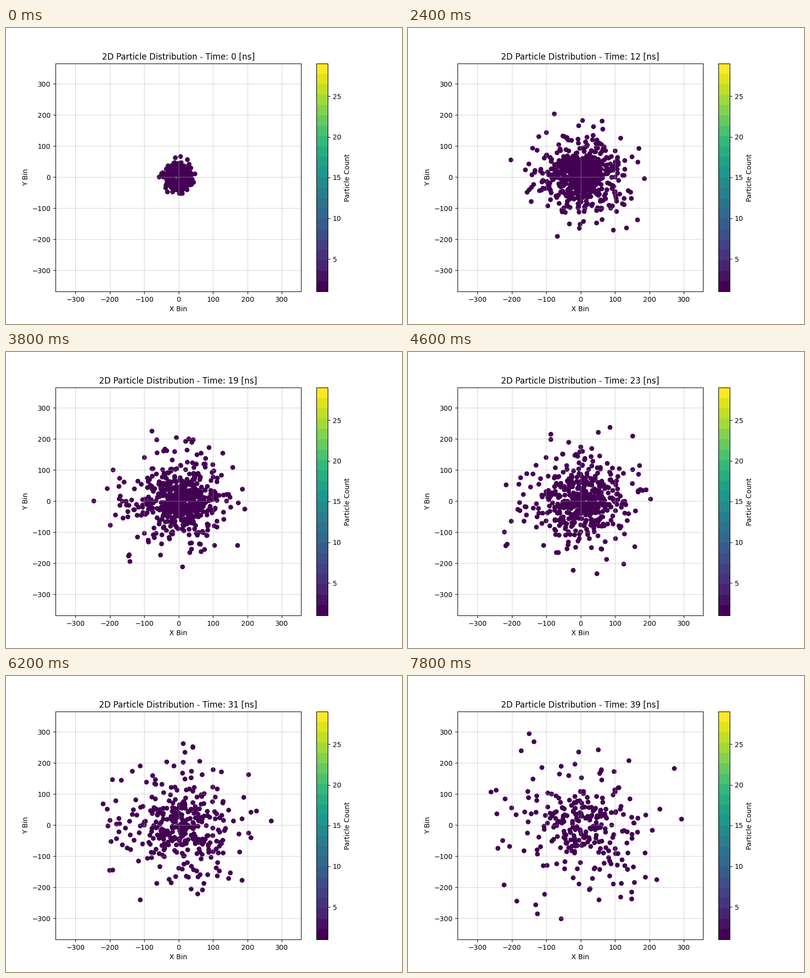
A matplotlib script for the animation above (8000 ms loop, 800 by 600 pixels).

```python
import numpy as np
import matplotlib.pyplot as plt
from matplotlib.animation import FuncAnimation
from matplotlib.colors import ListedColormap

STEPS = 40
COUNT = 1140
LIFETIME = 27.0
CORE_SHARE = 0.3
CORE_SPREAD, START_SPREAD = 4, 21
STEP_SIZE = 13.5

rng = np.random.default_rng(12)


def diffuse():
    """Random walks from a dense core with a halo, shape (STEPS, COUNT, 2)."""
    spread = np.where(rng.random(COUNT) < CORE_SHARE, CORE_SPREAD, START_SPREAD)
    radius = spread * np.abs(rng.normal(size=COUNT))
    angle = rng.uniform(0, 2 * np.pi, COUNT)
    speed = STEP_SIZE * rng.lognormal(0, 0.42, COUNT)
    moves = rng.normal(size=(STEPS, COUNT, 2)) * speed[:, None]
    moves[0] = np.column_stack([radius * np.cos(angle), radius * np.sin(angle)])
    return moves.cumsum(axis=0)


cloud = diffuse()
life = rng.exponential(LIFETIME, COUNT)


def bins_at(t):
    """Centres of occupied unit bins, ordered by x then y, with their counts."""
    reach = 165 + 4.5 * t
    alive = (life > t) & (np.hypot(*cloud[t].T) < reach)
    cells, counts = np.unique(np.floor(cloud[t, alive]), axis=0, return_counts=True)
    return cells + 0.5, counts


def banded_viridis(bands=22, size=462):
    """Viridis in equal flat bands."""
    band = np.arange(size) * bands // size
    return ListedColormap(plt.get_cmap("viridis")(band / (bands - 1)))


fig, ax = plt.subplots(figsize=(8, 6), dpi=100)
dots = ax.scatter([0], [0], c=[1], cmap=banded_viridis(), vmin=1, vmax=29)
fig.colorbar(dots, ax=ax, label="Particle Count")
ax.set_xlim(-357.95, 355.95)
ax.set_ylim(-367.85, 365.85)
ax.set_xlabel("X Bin")
ax.set_ylabel("Y Bin")
ax.grid(True, alpha=0.5)
title = ax.set_title("")


def draw(t):
    centres, counts = bins_at(t)
    dots.set_offsets(centres)
    dots.set_array(counts)
    title.set_text(f"2D Particle Distribution - Time: {t} [ns]")
    return dots, title


anim = FuncAnimation(fig, draw, frames=STEPS, interval=200, repeat=True, repeat_delay=0)
plt.show()
```
